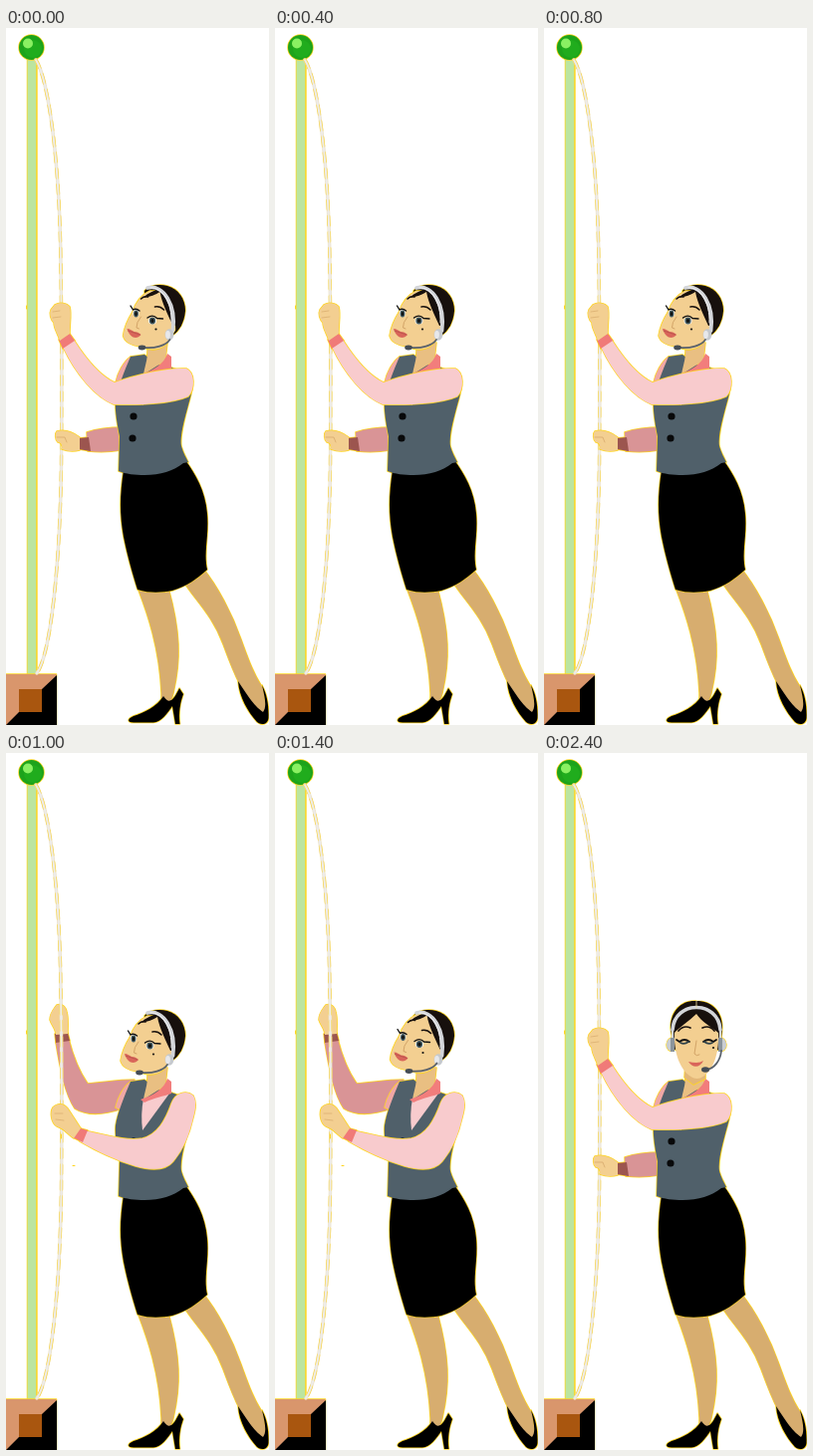
These frames come from a looping animation (264x700 px, 3000 ms). An HTML page:

```html
<!DOCTYPE html>
<html lang="en">
<head>
<meta charset="utf-8">
<title>Pulling the rope</title>
<style>
html, body { margin: 0; width: 100%; height: 100%; overflow: hidden; background: #fff; }
svg { display: block; width: 100vw; height: 100vh; }
</style>
</head>
<body>
<svg id="stage" viewBox="0 0 264 700" fill="none" stroke-linecap="round" stroke-linejoin="round"></svg>
<script>
const C = {
  skin: '#f3cf91', leg: '#d7ad6f', black: '#000', hair: '#17100d', vest: '#50606a',
  sleeve: '#f8cbcd', shade: '#d99496', cuff: '#f07a78', darkCuff: '#9c554f',
  coral: '#f27d7c', band: '#d3d5d9', wire: '#59616b', glow: '#ffd51e', lip: '#d9655a'
};
const fill = (d, c) => `<path d="${d}" fill="${c}"/>`;
const line = (d, c, w = 1, dash = 'none') =>
  `<path d="${d}" stroke="${c}" stroke-width="${w}" stroke-dasharray="${dash}"/>`;
const dot = (x, y, rx, c, ry = rx) => `<ellipse cx="${x}" cy="${y}" rx="${rx}" ry="${ry}" fill="${c}"/>`;
const group = (id, s) => `<g id="${id}">${s}</g>`;
// Shapes with a thin yellow rim around their joint silhouette
const rimmed = s => `<g stroke="${C.glow}" stroke-width="1.5">${s}</g>${s}`;

const pole = rimmed(fill('M21.5 31H30.5V649H21.5Z', '#bce5a0'))
  + line('M31 36V648', C.glow, 1.2) + line('M20.5 279V282', C.glow)
  + rimmed(dot(25.5, 19.5, 12.5, '#1da31b')) + dot(27, 21, 9, '#20ac1d') + dot(22, 15.5, 5, '#8af062');

const base = rimmed(fill('M0 649H50.5V700H0Z', '#d9966c'))
  + fill('M51 650V700H0L13 687H36V664Z', C.black) + fill('M13 664H36V687H13Z', '#a9560f');

const ropePath = 'M30 32C43 53 54 135 55 240C56 300 56 375 55.5 440C54 540 45 628 31 648';
const rope = line(ropePath, '#ece2c8', 3.4) + line(ropePath, '#f8d64e', 3.4, '9 7') + line(ropePath, '#eeecea', 2);

const legs = rimmed(
  fill('M132 562C142 588 154 622 156 668L156 682L163 684L168 668C176 634 175 606 163 562Z', C.leg)
  + fill('M177 554C189 574 207 589 218 619C225 638 229 648 235 660L252 690L262 690L258 663C248 648 243 633 236 614C227 588 212 560 198 543Z', C.leg)
  + fill('M158 671C152 681 138 688 128 691C121 694 122 697.5 128 697.5H148C156 697 162 688 167 681L170 699H174.5C173 688 175 677 178 669L174 663C170 671 165 682 158 671Z', C.black)
  + fill('M233 656C234 672 243 687 252 697C257 701 263 699 263.5 693C264 681 262 669 257 660C260 673 262 682 258 687C248 680 241 668 233 656Z', C.black));

const torso = rimmed(
  fill('M118 444C114 470 114 488 118 511C122 531 127 548 132 564C145 568 156 567 167 565C181 561 192 553 202 544C198 527 204 510 202 488C200 464 190 448 180 434Z', C.black)
  + fill('M125 330C118 335 112 346 110 356L119 360L129 336Z', '#efa7a5')
  + fill('M125 330L139 328L152 338L166 341L180 346C186 350 188 358 186 367C182 384 174 407 176 420C178 427 181 432 183 436L178 437C168 445 155 449 139 449C130 449 120 448 113 445L114 410C112 400 109 384 110 374C112 361 119 344 125 330Z', C.vest)
  + fill('M142 317L162 316L160 334L138 348C140 337 143 331 142 317Z', '#e9bf82'))
  + fill('M138 347L164 342L137 379Q135 363 138 347Z', C.sleeve)
  + fill('M162 327L166 330L166 342C158 345 149 346 139 351L135 348C148 344 159 337 162 327Z', C.coral);

const button = y => dot(128 - (y - 390) / 22, y, 3.6, '#08090a');

const hand = d => fill(d, C.skin);
const lowBackArm = rimmed(
  fill('M81 406C93 402 105 401 117 401L115 424C104 426 93 426 82 425Z', C.shade)
  + fill('M73 412L83 411L85 425L73 423Z', C.darkCuff)
  + hand('M51 405C58 403 66 405 74 411L74 424C67 426 61 425 56 423C57 419 55 416 52 416C49 413 49 407 51 405Z'))
  + line('M51 411H59L61 416', '#d3a569', .7);
const highFrontArm = rimmed(
  fill('M57 320L68 313C80 332 94 349 109 356C128 349 160 341 181 342C190 346 190 363 183 370C165 378 130 379 108 378C90 371 70 348 57 320Z', C.sleeve)
  + fill('M53 313L64 307L69 314L57 322Z', C.cuff)
  + hand('M49 278C54 275 61 276 64 280C66 287 64 296 64 307L54 314C52 307 48 302 48 296C45 293 43 287 45 283Z'))
  + line('M47 285L54 284M47 291L55 290', '#d7ab6e', .7);
const highBackArm = rimmed(
  fill('M50 291L63 287C67 303 73 319 82 332C97 331 112 328 129 328L117 357C100 363 82 365 69 357C59 342 54 316 50 291Z', C.shade)
  + fill('M49 282L62 281L64 289L50 291Z', C.darkCuff)
  + hand('M51 253C56 251 60 255 61 260C63 267 62 275 62 282L50 283C50 277 46 274 44 268C44 262 47 258 51 253Z'));
const lowFrontArm = rimmed(
  fill('M77 379C96 382 118 390 137 387C152 383 160 369 166 352C170 341 181 338 188 344C191 350 191 355 188 366C184 384 178 398 168 410C160 420 144 419 130 415C110 409 91 400 74 390Z', C.sleeve)
  + fill('M71 376L82 379L77 391L67 386Z', C.cuff)
  + hand('M47 356C52 351 58 352 62 357L75 377L68 387C61 382 58 377 51 375C45 371 44 361 47 356Z'))
  + line('M49 362L57 362M50 368L58 369', '#d7ab6e', .7);
const specks = line('M67 414.5H69M55.5 383V387', C.glow);

const sideHair = rimmed(fill('M139 264C144 258 154 257 162 259C173 262 180 272 180 284C179 296 174 304 167 309L156 303L140 277Z', C.hair));
const sideFace = rimmed(fill('M142 264C133 268 127 277 124 286C119 294 116 302 115 309C117 317 126 319 133 320C142 324 151 324 158 318L167 303C167 288 162 273 152 264Z', C.skin))
  + fill('M154 261C147 263 140 266 135 271C142 270 148 268 152 265C154 276 160 288 165 299L171 298L166 268Z', C.hair)
  + line('M133 272Q136 269 140 270M147 280Q152 279 156 283', C.hair, 1.6)
  + dot(128, 286.5, 3, '#fff', 3.7) + dot(128, 287, 2.4, '#3e555b', 3.4) + dot(128, 287, 1.3, '#111', 2.1)
  + dot(144.5, 294, 4, '#fff', 3.6) + dot(144.5, 294, 3.1, '#3e555b', 3.4) + dot(144.5, 294, 1.6, '#111', 2.1)
  + line('M131.5 284Q128 281 125 283L122.5 279M139.5 291Q145 287 149 291.5L155 292', '#111', 1.4)
  + line('M133 290Q128 296 128.5 301L131 302', '#cf9f62', .9)
  + fill('M119 302C122 302 124 304 126 305C129 305 131 306 133 308C129 313 122 312 119 302Z', C.lip)
  + line('M120 304L132 308', '#a94b45', .6) + dot(148, 302.5, 1.1, '#111');
const sideSet = line('M142 261C158 257 171 278 167.5 304', C.band, 3.8) + line('M145 261C157 260 167 276 166 296', '#f2f2f4', 1)
  + dot(164, 308, 4.4, '#c5c9ce', 5.7) + dot(162.5, 308, 2.4, '#e7e8eb', 4);
const sideMic = line('M162 313C158 319 147 322 136 321', C.wire, 1.7) + dot(134, 321, 3.8, '#454d55', 2.4);

const mirrorX = 153;
const both = s => s + `<g transform="translate(${mirrorX * 2} 0) scale(-1 1)">${s}</g>`;
const frontBase = rimmed(
    fill('M153 249C137 248 127 260 127 276L130 297L140 302H166L177 297L179 276C179 260 169 249 153 249Z', C.hair)
    + both(fill('M131 286C127 285 123 288 123 293C123 298 126 300 130 299Z', '#c9cdd2')))
  + rimmed(fill('M142 310H162V327L150 333L141 326Z', '#e3b778'))
  + fill('M153 262C146 269 135 276 131 281C130 299 136 317 146 324C151 328 156 328 161 324C171 317 176 299 175 281C168 275 158 270 153 262Z', C.skin)
  + line('M129 278C131 248 175 248 177 278', C.band, 3.6) + line('M153 249V256', '#e8d8a0', .8)
  + both(line('M129 277V289', C.band, 2.2) + fill('M127 286H131V300H127Z', '#8b949c')
    + line('M135 279Q140 273 147 276', C.hair, 1.7))
  + line('M153 289L151 302Q153 305 156 303', '#cf9f62', .9)
  + dot(170, 296, 1.1, '#111')
  + line('M178 299C177 309 171 317 163 318', C.wire, 1.8) + dot(162, 318, 4, '#454d55', 2.7);
const eyesOpen = both(dot(140.5, 290, 4.6, '#fff', 3.5) + dot(140.5, 290, 3.2, '#3d626d', 3.4) + dot(140.5, 290, 1.6, '#111', 2)
    + line('M132 287L135 288.5Q140 285 146 288.5', '#111', 1.6))
  + fill('M146 311Q149 310 153 312Q156 310 160 311C157 320 149 320 146 311Z', C.lip);
const eyesShut = both(line('M133 288L136 290Q141 286 146 290', '#111', 1.8) + line('M137 291Q141 293 145 290', '#30434a', 1.7))
  + fill('M145 310Q149 311 153 311Q157 311 160 309C157 316 149 317 145 310Z', C.lip);

const stage = document.getElementById('stage');
stage.innerHTML = pole + base
  + group('up', highBackArm) + rope + group('down', lowBackArm)
  + legs + torso + button(390) + group('button', button(412))
  + group('side', sideHair + group('face', sideFace) + sideSet + group('mic', sideMic))
  + group('front', frontBase + group('open', eyesOpen) + group('shut', eyesShut))
  + group('reachHigh', highFrontArm) + group('reachLow', lowFrontArm + specks);

const part = Object.fromEntries([...stage.querySelectorAll('g[id]')].map(g => [g.id, g]));
const show = (on, ...ids) => ids.forEach(id => part[id].setAttribute('visibility', on ? 'inherit' : 'hidden'));

function draw(ms) {
  const t = ms % 3000, step = Math.floor(t / 200);
  const pulling = t < 1800, swapped = pulling && step % 2 === 1;
  show(swapped, 'up', 'reachLow');
  show(!swapped, 'down', 'reachHigh', 'button');
  show(pulling, 'side');
  show(!pulling, 'front');
  show(!pulling && t < 2400, 'open');
  show(t >= 2400, 'shut');
  // The face turns a little toward the rope, then tips up
  const [x, y] = step < 2 ? [2.5, 0] : step < 7 ? [0, 0] : [0.5, -1.5];
  part.face.setAttribute('transform', `translate(${x} ${y})`);
  part.mic.setAttribute('transform', `translate(${x} ${y})`);
}

const start = performance.now();
function tick() {
  draw(performance.now() - start);
  requestAnimationFrame(tick);
}
tick();
</script>
</body>
</html>
```
